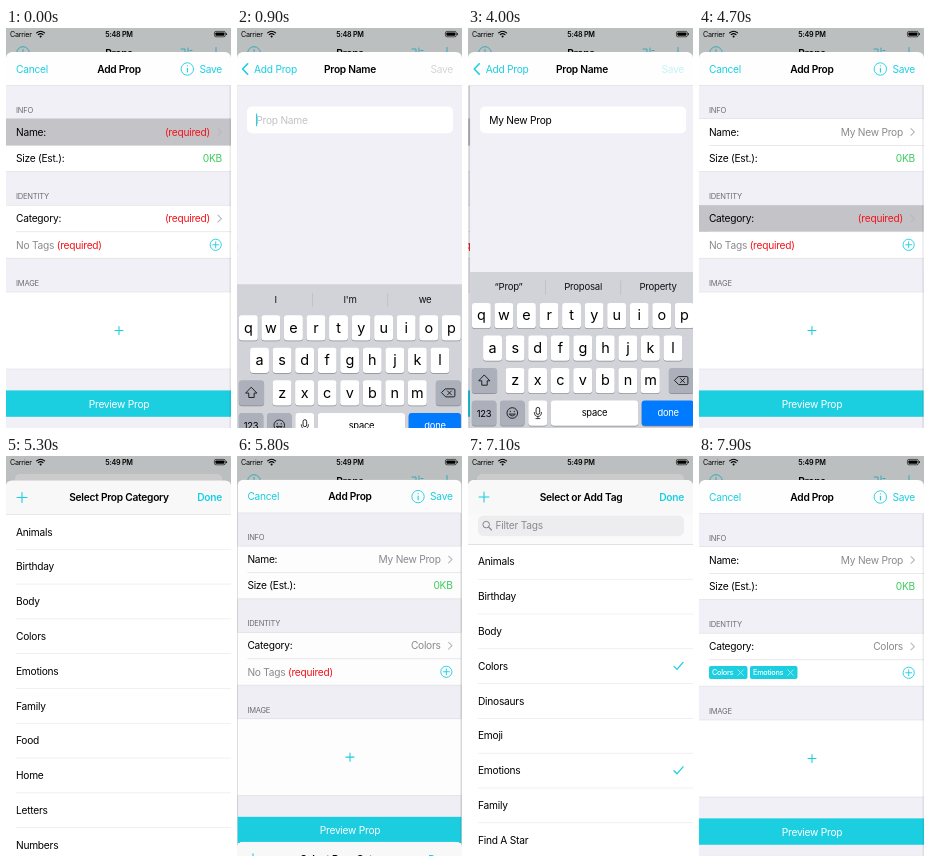
These frames come from a looping animation (225x400 px, 8 s). An HTML page:

```html
<!DOCTYPE html>
<html lang="en">
<head>
<meta charset="utf-8">
<title>Add Prop</title>
<style>
html, body { margin: 0; width: 100%; height: 100%; overflow: hidden; background: #bcbfbf; }
svg { display: block; width: 100vw; height: 100vh; }
text { font-family: Inter, Roboto, "Liberation Sans", sans-serif; letter-spacing: -0.25px; white-space: pre; }
</style>
</head>
<body>
<svg id="stage" viewBox="0 0 225 400" xmlns="http://www.w3.org/2000/svg"></svg>
<script>
const LOOP = 8000, STEP = 100;
const TEAL = '#1bcfe1', GRAY = '#8a8a8e', RED = '#f3141b', PAPER = '#f1f0f6', LINE = '#dcdce0';

// Markup helpers; text is placed by its vertical centre
const attrs = o => Object.entries(o).map(([k, v]) => ` ${k}="${v}"`).join('');
const rect = (x, y, w, h, fill, o = {}) =>
  `<rect x="${x}" y="${y}" width="${w}" height="${h}" fill="${fill}"${attrs(o)}/>`;
const path = (d, stroke, width = 1, o = {}) =>
  `<path d="${d}" fill="none" stroke="${stroke}" stroke-width="${width}" stroke-linecap="round" stroke-linejoin="round"${attrs(o)}/>`;
const label = (x, y, str, fill = '#000', o = {}) => {
  const size = o['font-size'] || 10.2;
  return `<text x="${x}" y="${(y + size * .36).toFixed(2)}" fill="${fill}"${attrs({ 'font-size': size, ...o })}>${str}</text>`;
};
const END = { 'text-anchor': 'end' }, MID = { 'text-anchor': 'middle' }, BOLD = { 'font-weight': 600 };
const group = (id, body, o = {}) => `<g id="${id}"${attrs(o)}>${body}</g>`;
const rule = (y, x = 0, color = LINE) => rect(x, y - .3, 225 - x, .6, color);
const plus = (x, y, r, color, w = 1) => path(`M${x - r} ${y}h${2 * r}M${x} ${y - r}v${2 * r}`, color, w);
const ring = (x, y, r) => `<circle cx="${x}" cy="${y}" r="${r}" fill="none" stroke="${TEAL}" stroke-width=".9"/>`;
const chevron = y => path(`M212 ${y - 3.4}l3.4 3.4l-3.4 3.4`, '#b9b9be', 1.1);

function root() {
  const dim = '#35aab4';
  return rect(0, 0, 225, 400, '#bcbfbf') +
    `<circle cx="17" cy="25" r="6.3" fill="none" stroke="${dim}"/>` + path('M17 21.5v4', dim) +
    label(113, 25, 'Props', '#000', { ...MID, ...BOLD }) +
    path('M175 21h4v8M182 20v9M184 22.5h2', dim) + plus(210, 25, 5.5, dim);
}

function statusBar() {
  const small = { 'font-size': 7.2, 'letter-spacing': 0 };
  return label(4, 6.2, 'Carrier', '#000', small) +
    path('M30.6 4.9q4-3.3 8 0M32.2 6.6q2.4-2 4.8 0', '#000', 1.1) +
    '<circle cx="34.6" cy="8.4" r="1"/>' +
    label(113, 6.2, '', '#000', { ...small, ...MID, ...BOLD, id: 'clock' }) +
    rect(208.4, 3.4, 11, 5.4, 'none', { rx: 1.6, stroke: '#000', 'stroke-width': .6 }) +
    rect(209.4, 4.4, 9, 3.4, '#000', { rx: .8 }) + rect(220, 5.2, .8, 1.9, '#000');
}

function chip(x, w, name) {
  const cx = x + w - 7;
  return rect(x, 210, w, 13, TEAL, { rx: 2 }) +
    label(x + 3, 216.6, name, '#fff', { 'font-size': 7.3, 'letter-spacing': 0, 'font-weight': 500 }) +
    path(`M${cx - 2.7} 213.8l5.6 5.6m0-5.6l-5.6 5.6`, '#c9f5fa', .7);
}

function form() {
  const head = (y, s) => label(10, y, s, '#6d6d72', { 'font-size': 7.6, 'letter-spacing': 0 });
  const block = (y, h) => rect(0, y, 225, h, '#fff') + rule(y) + rule(y + h);
  return rect(0, 57, 225, 343, PAPER) +
    head(82, 'INFO') + block(90.6, 53) +
    rect(0, 90.6, 225, 27, '#c4c3c8', { id: 'nameTap' }) + rule(117.4, 10) +
    label(10, 104, 'Name:') + label(204, 104, '', RED, { ...END, id: 'nameValue' }) + chevron(104) +
    label(10, 130.5, 'Size (Est.):') + label(216, 130.5, '0KB', '#3ecb5f', END) +
    head(168.5, 'IDENTITY') + block(177.2, 53) +
    rect(0, 177.2, 225, 26.6, '#c4c3c8', { id: 'categoryTap' }) + rule(203.8, 10) +
    label(10, 190.6, 'Category:') + label(204, 190.6, '', RED, { ...END, id: 'categoryValue' }) + chevron(190.6) +
    group('noTags', label(10, 217, `No Tags <tspan fill="${RED}">(required)</tspan>`, GRAY)) +
    group('chips', chip(10, 38.5, 'Colors') + chip(51, 47.5, 'Emotions')) +
    ring(209.7, 216.8, 5.6) + plus(209.7, 216.8, 3, TEAL, .9) +
    head(255, 'IMAGE') + block(264, 77) + plus(113, 302.5, 4, TEAL, 1.1) +
    rect(0, 362.4, 225, 26.4, TEAL) + label(113, 376, 'Preview Prop', '#fff', MID);
}

function keyboard() {
  const key = (x, y, w, fill = '#fff') =>
    rect(x, y + .7, w, 25.2, '#898b90', { rx: 3 }) + rect(x, y, w, 25.2, fill, { rx: 3 });
  const dark = '#abb0ba';
  const small = { ...MID, 'font-size': 9.4 };
  const letters = ['qwertyuiop', 'asdfghjkl', 'zxcvbnm'].map((row, r) =>
    [...row].map((c, i) => {
      const x = [1.8, 13, 35.5][r] + i * 22.55, y = 275 + r * 32.5;
      return key(x, y, 18.9) + label(x + 9.45, y + 12.2, c, '#000', { ...MID, 'font-size': 14.4 });
    }).join('')).join('');
  return rect(0, 244, 225, 160, '#d1d3d9') +
    rect(75, 252.5, .6, 14, '#b5b7bd') + rect(150.4, 252.5, .6, 14, '#b5b7bd') +
    [38.5, 113, 188].map((x, i) => label(x, 259, '', '#111', { ...MID, 'font-size': 9.6, id: 'hint' + i })).join('') +
    letters +
    key(1.8, 340, 25.2, dark) + path('M14.4 347.2l5.4 5.6h-2.7v4.4h-5.4v-4.4h-2.7z', '#111', .9) +
    key(198.8, 340, 25, dark) + path('M208.6 348.6h8.2q1 0 1 1v6q0 1-1 1h-8.2l-4-4zM210.4 350.6l4 4m0-4l-4 4', '#111', .9) +
    key(1.8, 372.6, 24.4, dark) + label(14, 385.2, '123', '#000', small) +
    key(30, 372.6, 24.4, dark) + '<circle cx="42.2" cy="385" r="5.3" fill="none" stroke="#111" stroke-width=".9"/>' +
    path('M40.2 383.2v.6M44.2 383.2v.6M39.4 386.4q2.8 3.4 5.6 0z', '#111', .9) +
    key(58.2, 372.6, 18.9) + rect(66, 379.4, 3.6, 7, 'none', { rx: 1.8, stroke: '#111', 'stroke-width': .9 }) +
    path('M64.2 384.4q0 4 3.6 4t3.6-4M67.8 388.4v2.2M65.8 390.6h4', '#111', .8) +
    key(80.8, 372.6, 87.2) + label(124.4, 385, 'space', '#000', small) +
    key(171.6, 372.6, 52.2, '#007aff') + label(198, 385, 'done', '#fff', small);
}

function editor() {
  return rect(-1.5, 57, 1.5, 343, '#000', { opacity: .08 }) + rect(0, 57, 225, 343, PAPER) +
    rect(10, 78.6, 206, 26.6, '#fff', { rx: 5 }) +
    label(19.2, 92, '', '#000', { id: 'entry' }) + rect(19, 85.6, 1.1, 12.6, TEAL, { id: 'cursor' }) +
    group('keys', keyboard());
}

function bars() {
  return rect(0, 24, 225, 33.4, '#fefefe') + rule(57.4) +
    group('formButtons', label(10, 41, 'Cancel', TEAL) + label(216, 41, 'Save', TEAL, END) +
      ring(181.3, 41, 6.2) + path('M181.4 40.4v3.6M181.4 37.8v.2', TEAL, 1.1)) +
    label(0, 41, 'Add Prop', '#000', { ...MID, ...BOLD, id: 'formTitle' }) +
    group('back', path('M10.6 35.8l-5 5.2l5 5.2', TEAL, 1.6) + label(17, 41, 'Add Prop', TEAL)) +
    label(0, 41, 'Prop Name', '#000', { ...MID, ...BOLD, id: 'editorTitle' }) +
    label(216, 41, 'Save', TEAL, { ...END, id: 'editorSave' });
}

const ROW = 34.8;
function picker(title, top, names, extra = '') {
  const rows = names.map((name, i) => {
    const y = top + i * ROW;
    return label(10, y + ROW / 2, name) + rule(y + ROW, 10, '#e6e6e9');
  }).join('');
  return rect(0, 24, 225, 400, '#fff') + rect(0, 24, 225, 34, '#f8f8f8') + rule(top) +
    plus(16, 41, 5, TEAL, 1.1) + label(113, 41, title, '#000', { ...MID, ...BOLD }) +
    label(216, 41, 'Done', TEAL, { ...END, ...BOLD }) + extra + rows;
}
const tick = (id, row) =>
  path(`M206 ${88.4 + row * ROW + 17.6}l3 3l6-7`, TEAL, 1.3, { id });

const clip = { 'clip-path': 'url(#sheetShape)' };
document.getElementById('stage').innerHTML =
  '<defs><clipPath id="sheetShape"><rect x="0" y="24" width="225" height="420" rx="6"/></clipPath></defs>' +
  root() +
  group('card', `<g${attrs(clip)}>` + group('form', form()) +
    rect(0, 57, 225, 343, '#000', { id: 'formShade' }) +
    group('editor', editor()) + bars() +
    rect(0, 24, 225, 400, '#000', { id: 'cardShade' }) + '</g>') +
  group('categories', `<g${attrs(clip)}>` + picker('Select Prop Category', 58,
    ['Animals', 'Birthday', 'Body', 'Colors', 'Emotions', 'Family', 'Food', 'Home', 'Letters', 'Numbers'],
    rect(0, 58 + 3 * ROW, 225, ROW, '#d1d1d6', { id: 'colorsTap' })) + '</g>') +
  group('tags', `<g${attrs(clip)}>` + picker('Select or Add Tag', 88.4,
    ['Animals', 'Birthday', 'Body', 'Colors', 'Dinosaurs', 'Emoji', 'Emotions', 'Family', 'Find A Star'],
    rect(0, 58, 225, 30, '#fafafa') + rule(88.4) + rect(10, 59.4, 206, 20.8, '#ededef', { rx: 5.5 }) +
    '<circle cx="18.2" cy="68.6" r="3.3" fill="none" stroke="#85858a"/>' + path('M20.7 71.2l2.8 2.8', '#85858a', 1.1) +
    label(27.5, 69.8, 'Filter Tags', GRAY) + tick('tickColors', 3) + tick('tickEmotions', 6)) + '</g>') +
  statusBar();

const el = {};
document.querySelectorAll('[id]').forEach(n => { el[n.id] = n; });
const set = (id, o) => { for (const k in o) el[id].setAttribute(k, o[k]); };
const fade = (id, v) => set(id, { opacity: Math.max(0, Math.min(1, v)) });
const show = (id, on) => fade(id, on ? 1 : 0);
const move = (id, x, y = 0) => set(id, { transform: `translate(${x} ${y})` });
const write = (id, s) => { if (el[id].innerHTML !== s) el[id].innerHTML = s; };

// Critically damped approach from 0 to 1
const spring = (t, start, rate) => {
  const x = Math.max(0, t - start) / 1000 * rate;
  return 1 - (1 + x) * Math.exp(-x);
};
const visit = (t, open, close, rate) => spring(t, open, rate) - spring(t, close, rate);

const ENTRY = 'My New Prop';
const KEY_TIMES = [1300, 1500, 1700, 1900, 2100, 2300, 2500, 2700, 2900, 3000, 3200];
const faint = s => `<tspan opacity=".3">${s}</tspan>`;
const HINTS = [
  ['I', 'I\'m', 'we'], ['“M”', 'My', 'Me'], ['“My”', 'Myself', 'Mine'], ['name', 'new', 'own'],
  ['“N”', 'No', 'Not'], ['“Ne”', 'Need', 'New'],
  [faint('“') + 'one”', 'N' + faint('e') + 'd', faint('N') + 'ient'],
  ['one', 'and', 'friend'], ['“P”', 'Phone', 'Place'], ['“Pr”', 'Pretty', 'Product'],
  ['“Pro”', 'Problem', 'Project'], ['“Prop”', 'Proposal', 'Property']
];

function draw(t) {
  const push = visit(t, 80, 3989, 13);
  const categories = visit(t, 4700, 5480, 15);
  const tags = visit(t, 5917, 7260, 15);
  const stacked = Math.min(1, categories + tags);

  write('clock', t < 4200 ? '5:48 PM' : '5:49 PM');

  move('form', -67.5 * push);
  fade('formShade', .1 * push);
  move('editor', 225 * (1 - push));
  set('formTitle', { x: 113 - 75 * push });
  fade('formTitle', 1 - push * 1.4);
  fade('formButtons', 1 - push * 1.4);
  set('editorTitle', { x: 113 + 112 * (1 - push) });
  fade('editorTitle', push);
  fade('back', push);
  move('back', 70 * (1 - push));

  const rise = Math.max(0, Math.min(1, (t - 700) / 350));
  move('keys', 0, 156 * (1 - rise) ** 3);
  const typed = KEY_TIMES.filter(k => k <= t).length;
  write('entry', typed ? ENTRY.slice(0, typed) : 'Prop Name');
  set('entry', { fill: typed ? '#000' : '#c3c3c7' });
  set('cursor', { x: typed ? 19.6 + el.entry.getComputedTextLength() : 19 });
  show('cursor', t >= 600 && t < 3700);
  HINTS[typed].forEach((s, i) => write('hint' + i, s));
  set('editorSave', { fill: typed ? TEAL : '#d3d3d6' });
  // The bar button is only solid once the page has settled
  fade('editorSave', push ** 150);

  const named = t >= 3700, sorted = t >= 5480, tagged = t >= 7260;
  write('nameValue', named ? ENTRY : '(required)');
  set('nameValue', { fill: named ? GRAY : RED });
  write('categoryValue', sorted ? 'Colors' : '(required)');
  set('categoryValue', { fill: sorted ? GRAY : RED });
  show('noTags', !tagged);
  show('chips', tagged);
  fade('nameTap', t < 3900 ? 1 : push);
  show('categoryTap', t >= 4600 && t < 5500);

  set('card', { transform: `translate(${9 * stacked} ${24 - 6 * stacked}) scale(${1 - .08 * stacked}) translate(0 -24)` });
  fade('cardShade', .2 * stacked);
  move('categories', 0, 380 * (1 - categories));
  show('categories', categories > .002);
  show('colorsTap', t >= 5400);
  move('tags', 0, 376 * (1 - tags));
  show('tags', tags > .002);
  show('tickColors', t >= 6700);
  show('tickEmotions', t >= 7000);
}

const begin = performance.now();
function tickFrame() {
  const t = (performance.now() - begin) % LOOP;
  draw(Math.floor(t / STEP) * STEP);
  requestAnimationFrame(tickFrame);
}
tickFrame();
</script>
</body>
</html>
```
